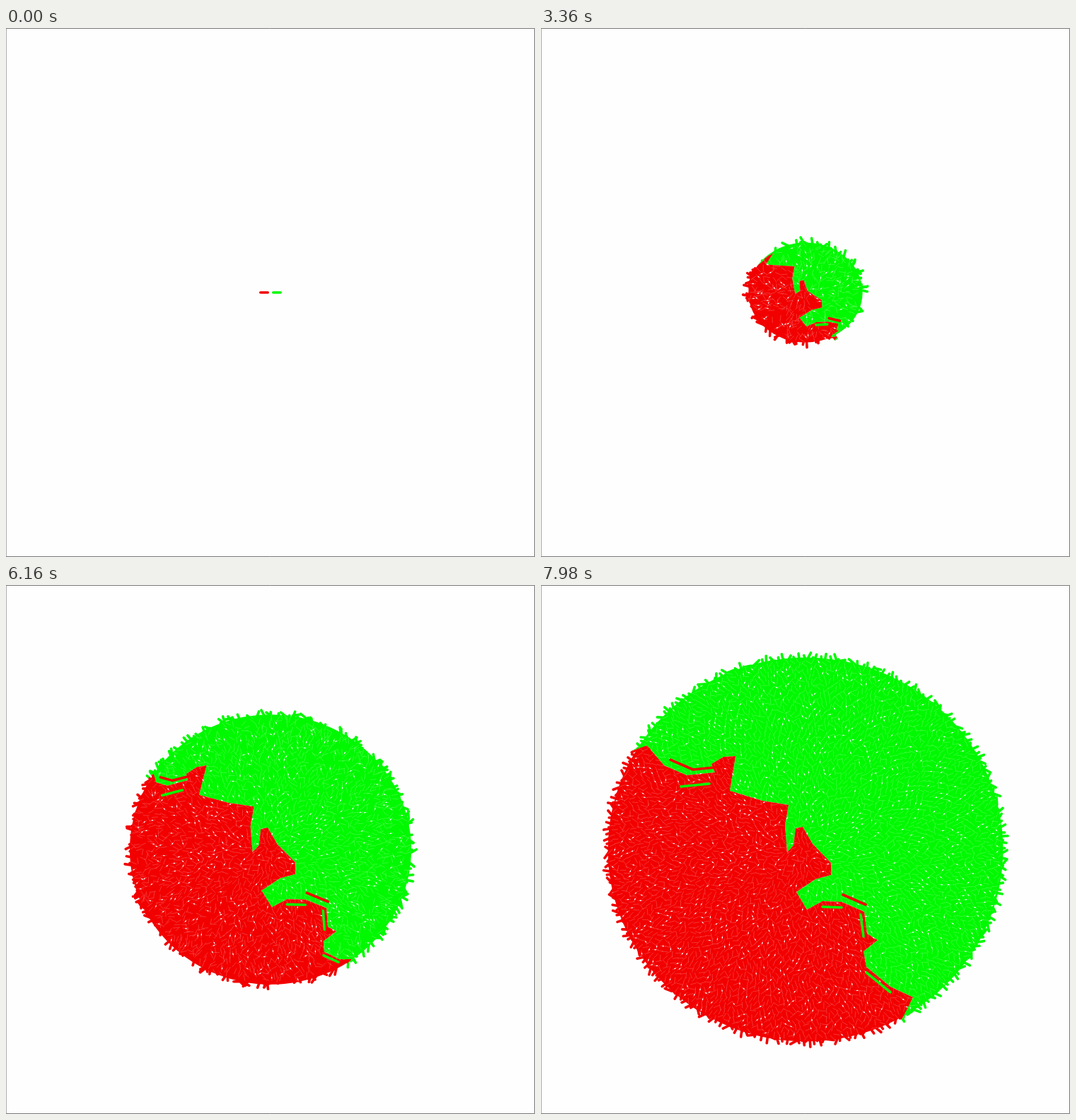
Write an HTML page with a canvas that moves like this. It is 748x748 px and loops after 8.12 s.

```html
<!DOCTYPE html>
<html lang="en">
<head>
<meta charset="utf-8">
<title>Growing colony</title>
<style>
html, body { margin: 0; width: 100%; height: 100%; overflow: hidden; background: #fefefe; }
canvas { display: block; width: 748px; height: 748px; }
</style>
</head>
<body>
<canvas id="c" width="748" height="748"></canvas>
<script>
const ctx = document.getElementById('c').getContext('2d');
const SIZE = 748, MID = SIZE / 2, STEP = 140, STEPS = 58, FEW = 8;
const PAPER = '#fefefe', RED = '#f20000', GREEN = '#00f800';
const LAYER = 45, COUNT = 5000, HALF = 5.2, THICK = 3.6;

// Exponential growth that turns into a steady advance of the rim
function sizeAt(step) {
  return {
    R: 37.2 * Math.log(1 + Math.exp((step - 12.1) / 6)),
    e: 4 + 8 * Math.exp((FEW - step) / 8)
  };
}
const LAST = sizeAt(STEPS - 1), FULL = LAST.R, STRETCH = 1 + LAST.e / FULL;

// Key points of the border between the colours in the grown colony
const BORDER = [
  [40, 190], [130, 234], [150, 227], [174, 255], [206, 269], [246, 265],
  [241, 253], [258, 243], [275, 242], [267, 291], [313, 305], [350, 311],
  [345, 340], [348, 378], [357, 368], [360, 344], [370, 342], [384, 366],
  [410, 393], [410, 410], [388, 416], [361, 434], [376, 459], [398, 447],
  [425, 448], [457, 462], [461, 493], [476, 502], [456, 518], [460, 540],
  [494, 568], [526, 583], [507, 620], [520, 690]
];
const OUTSIDE = [[520, 2200], [-1600, 2200], [-1600, 190]];

// A single file of cells runs beside a stretch of the border
const strand = (color, from, to, dx, dy) => ({
  color,
  pts: BORDER.slice(from, to + 1).map(([x, y]) => [x + dx, y + dy])
});
const STRANDS = [
  strand(RED, 3, 5, 9, -8),
  strand(RED, 24, 25, 2, -10),
  strand(GREEN, 23, 24, 0, 8),
  strand(GREEN, 25, 26, -5, 4),
  strand(GREEN, 4, 5, -8, 16),
  strand(GREEN, 29, 30, 0, 8)
];

let seed = 71;
function rand() {
  seed = (seed + 0x6d2b79f5) | 0;
  let t = Math.imul(seed ^ (seed >>> 15), 1 | seed);
  t = (t + Math.imul(t ^ (t >>> 7), 61 | t)) ^ t;
  return ((t ^ (t >>> 14)) >>> 0) / 4294967296;
}

const cells = Array.from({ length: COUNT }, (_, i) => {
  const a = i * 2.399963;
  const r = FULL * Math.sqrt((i + 0.5) / COUNT);
  return {
    x: r * Math.cos(a) * STRETCH,
    y: r * Math.sin(a) / STRETCH,
    tilt: a + (rand() + rand() - 1) * 1.6,
    rank: rand(),
    gap: rand() < 0.2
  };
});

// Moves a point of the grown colony back to where it lies at radius R.
// Growth takes place in a thin outer layer, so the inside comes to rest.
function place(x, y, { R, e }) {
  x /= STRETCH;
  y *= STRETCH;
  const end = Math.hypot(x, y) || 0.01;
  let r = R + end - FULL, slope = 1;
  if (end < FULL) {
    const u = Math.exp(-end / LAYER) + Math.exp(-R / LAYER) - Math.exp(-FULL / LAYER);
    const even = end * R / FULL;
    r = -LAYER * Math.log(u);
    slope = Math.exp(-end / LAYER) / u;
    if (r < even) [r, slope] = [even, R / FULL];
  }
  const k = r / end;
  return {
    x: MID + x * k * (1 + e / R),
    y: MID + y * k * (1 - e / R),
    depth: R - r,
    density: k * slope
  };
}

function trace(pts, size) {
  const path = new Path2D();
  for (const [x, y] of pts) {
    const p = place(x - MID, y - MID, size);
    path.lineTo(p.x, p.y);
  }
  return path;
}

function addRod(path, x, y, tilt, half = HALF) {
  const dx = half * Math.cos(tilt), dy = half * Math.sin(tilt);
  path.moveTo(x - dx, y - dy);
  path.lineTo(x + dx, y + dy);
}

function stroke(path, color, width = THICK) {
  ctx.strokeStyle = color;
  ctx.lineWidth = width;
  ctx.stroke(path);
}

// The first few cells form a row that slowly buckles
function drawFew(step) {
  const n = Math.round(2 * 10 ** (step / FEW));
  const red = new Path2D(), green = new Path2D();
  for (let i = 0; i < n; i++) {
    const u = (2 * i + 1) / n - 1;
    const v = ((i * 0.618 + 0.4) % 1) * 2 - 1;
    const x = u * (18 + 1.45 * step);
    const y = v * 1.25 * step * Math.sqrt(1 - u * u);
    addRod(x < 0 ? red : green, MID + x, MID + y, (cells[i].rank - 0.5) * 0.13 * step);
  }
  stroke(red, RED);
  stroke(green, GREEN);
}

function drawColony(step) {
  const size = sizeAt(step), { R, e } = size;
  const body = new Path2D(), rim = new Path2D(), seams = new Path2D(), gaps = new Path2D();
  body.ellipse(MID, MID, R + e - 3, R - e - 3, 0, 0, 2 * Math.PI);
  for (const c of cells) {
    const p = place(c.x, c.y, size);
    if (c.rank > p.density) continue;
    if (p.depth < 20) addRod(rim, p.x, p.y, c.tilt);
    if (p.depth < 6) continue;
    const x = p.x - 2.3 * Math.sin(c.tilt), y = p.y + 2.3 * Math.cos(c.tilt);
    addRod(seams, x, y, c.tilt, 4);
    if (c.gap) addRod(gaps, x, y, c.tilt, 0.7);
  }

  const red = trace([...BORDER, ...OUTSIDE], size);
  red.closePath();
  const green = new Path2D(red);
  green.rect(-5000, -5000, 10000, 10000);

  for (const [color, area] of [[GREEN, green], [RED, red]]) {
    ctx.save();
    ctx.clip(area, 'evenodd');
    ctx.fillStyle = color;
    ctx.fill(body);
    stroke(rim, color);
    ctx.restore();
  }
  stroke(seams, 'rgba(254, 254, 254, 0.3)', 0.7);
  stroke(gaps, PAPER, 1.3);

  for (const { color, pts } of STRANDS) {
    const reach = Math.hypot(pts[0][0] - MID, pts[0][1] - MID);
    if (R > reach * 0.68) stroke(trace(pts, size), color);
  }
}

function draw(step) {
  ctx.fillStyle = PAPER;
  ctx.fillRect(0, 0, SIZE, SIZE);
  ctx.lineCap = ctx.lineJoin = 'round';
  step <= FEW ? drawFew(step) : drawColony(step);
  ctx.strokeStyle = '#777';
  ctx.lineWidth = 1;
  ctx.strokeRect(0.5, 0.5, SIZE - 1, SIZE - 1);
}

const start = performance.now();
let shown = -1;
function tick() {
  const step = Math.floor((performance.now() - start) / STEP) % STEPS;
  if (step !== shown) draw(shown = step);
  requestAnimationFrame(tick);
}
tick();
</script>
</body>
</html>
```
